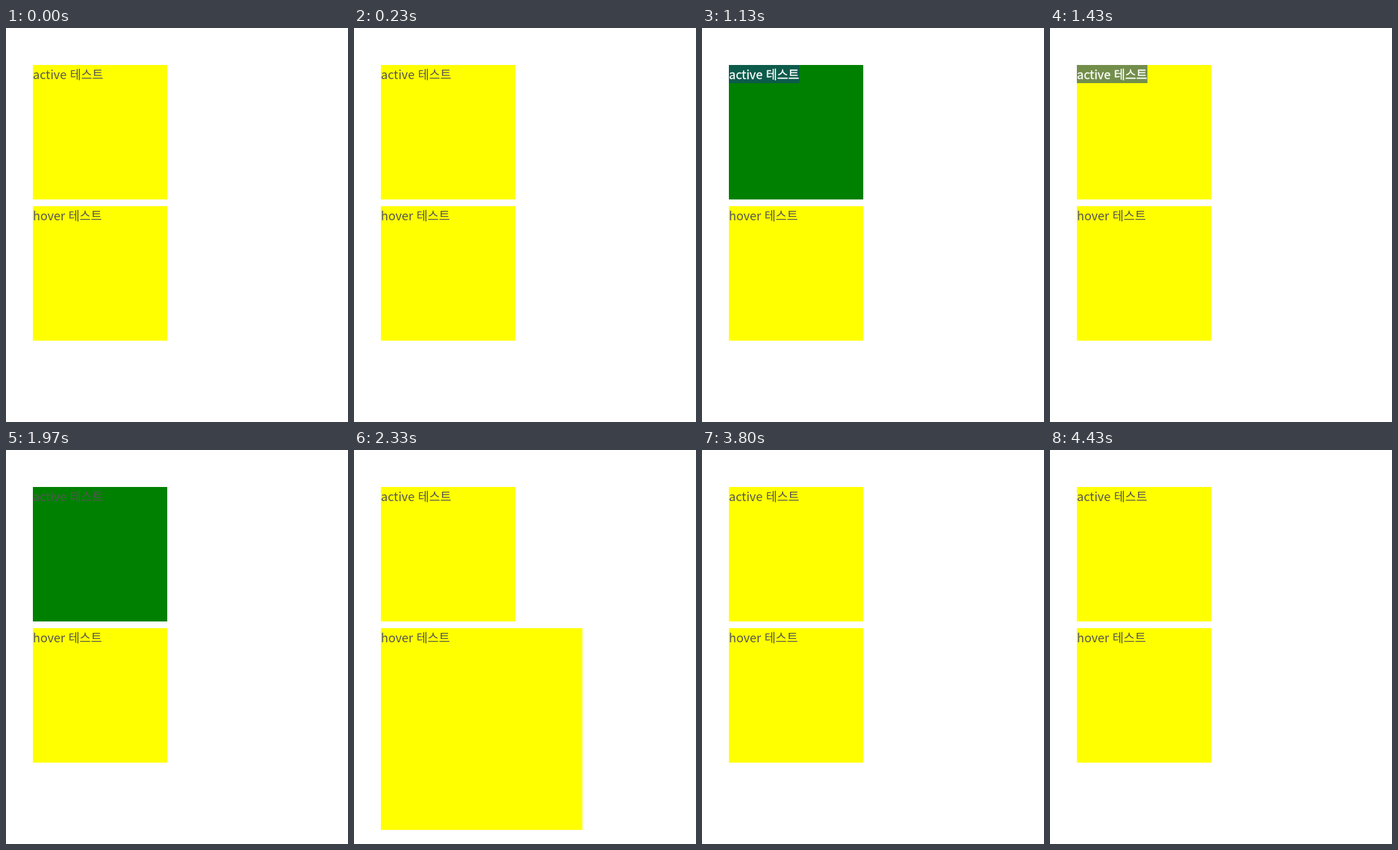
Recreate the animation shown at these times as an HTML page. Size 509 px wide and 586 px high, loop 4.79 s.

```html
<!DOCTYPE html>
<html lang="ko">
<head>
<meta charset="utf-8">
<style>
  html, body { margin: 0; width: 100%; height: 100%; overflow: hidden; background: #fff; }
  body { font: 18px/27px "Noto Sans CJK KR", "Noto Sans KR", "Noto Sans CJK", sans-serif; color: #555; }
  .box { position: absolute; left: 40px; width: 200px; height: 200px; background: #ff0; white-space: nowrap; }
  .box span { display: inline-block; height: 27px; vertical-align: top; }
  #press { top: 55px; }
  #grow { top: 265px; }
  #press.active { background: green; }
  #press.selected span { color: #fff; background: rgba(22, 67, 125, .6); -webkit-text-stroke: .3px #fff; }
  #grow.hover { width: 300px; height: 300px; }
</style>
</head>
<body>
<div class="box" id="press"><span>active 테스트</span></div>
<div class="box" id="grow"><span>hover 테스트</span></div>
<script>
  const LOOP = 4790;
  // Each pair is [start, end] in ms.
  const presses = [[170, 230], [570, 670], [830, 900], [1130, 1210], [1340, 1430], [1970, 2100]];
  // The third quick click selects the line; the next slow click clears it.
  const selections = [[830, 1970]];
  const hovers = [[2330, 3030], [3370, 3800], [4070, 4430]];

  const press = document.getElementById('press');
  const grow = document.getElementById('grow');
  const within = (spans, t) => spans.some(([start, end]) => t >= start && t < end);

  function draw() {
    const t = performance.now() % LOOP;
    press.classList.toggle('active', within(presses, t));
    press.classList.toggle('selected', within(selections, t));
    grow.classList.toggle('hover', within(hovers, t));
    requestAnimationFrame(draw);
  }
  draw();
</script>
</body>
</html>
```
